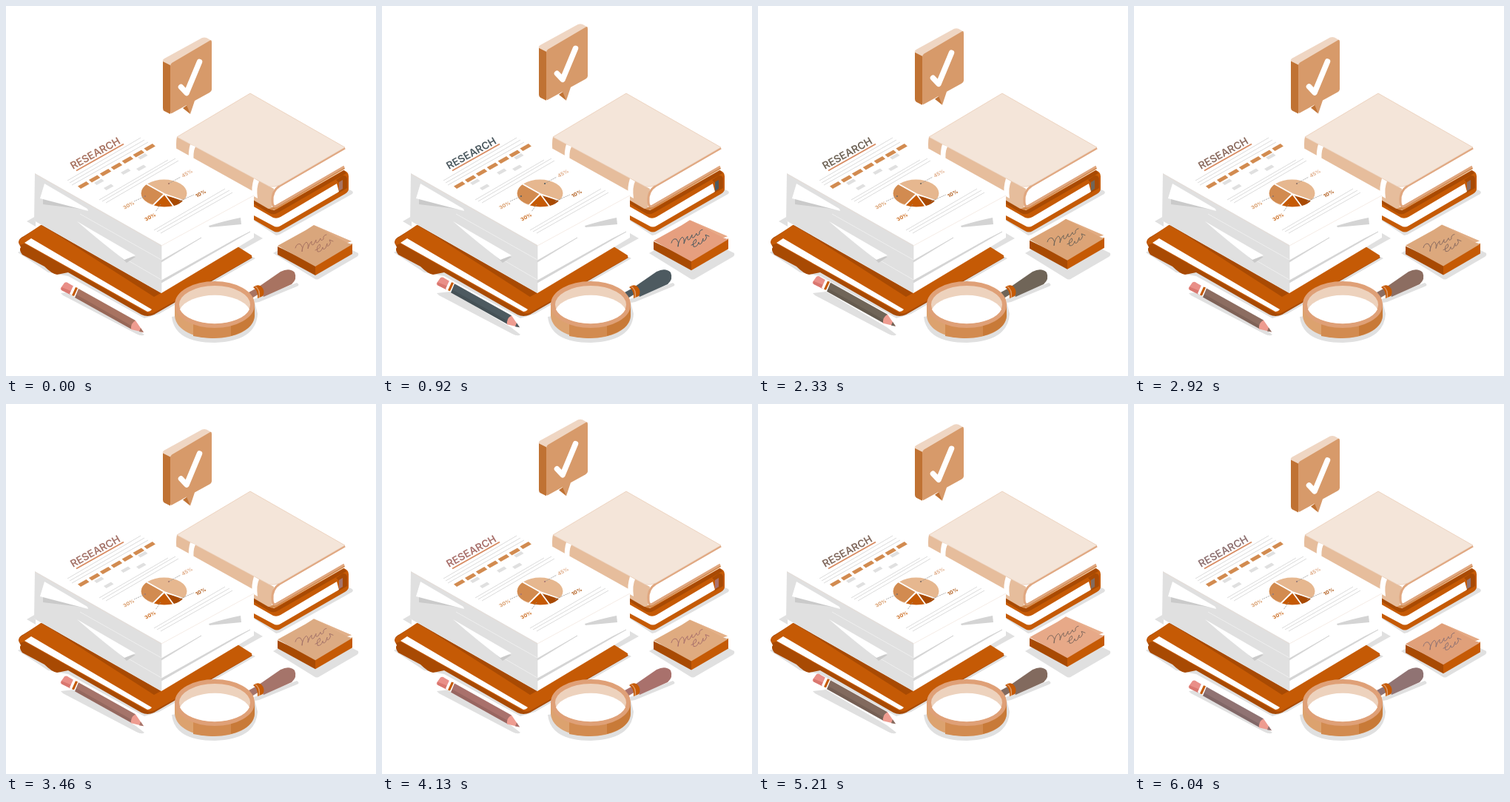
Write an HTML page that moves like this. It is 500 by 500 pixels and loops after 6080 ms.

```html
<!DOCTYPE html>
<html lang="en">
<head>
<meta charset="utf-8">
<title>Research</title>
<style>
html, body { margin: 0; width: 100%; height: 100%; overflow: hidden; background: #fff; }
svg { display: block; width: 100vw; height: 100vh; }
text { font-family: Inter, "Open Sans", sans-serif; }
.shade { fill: #e0e0e0; }
.orange { fill: #c55a05; }
.rust { fill: #a84a03; }
.tan { fill: #d28b50; }
.peach { fill: #e6bd9c; }
.ink { fill: var(--ink); }
.note { fill: var(--note); }
.white { fill: #fff; }
.rule { fill: none; stroke: #d2d2d2; stroke-width: .8; }
.pen { fill: none; stroke: var(--ink); stroke-width: 1; stroke-linecap: round; stroke-linejoin: round; }
.label { font-size: 7px; font-weight: 600; }
</style>
</head>
<body>
<svg viewBox="0 0 500 500">
  <g id="shadows" class="shade">
    <path d="M16 333L57 360L84 365L187 422L207 416L337 341L300 322L60 310Z"/>
    <path d="M28 291L40 284V298ZM335 307L347 314L300 340L210 391L335 300Z"/>
    <path d="M335 290L365 310Q369 310 373 307L466 255Q472 252 466 249L440 240Z"/>
    <path d="M361 334L415 303L476 334Q477 337 474 339L424 368Q420 371 416 368Z"/>
    <path d="M224 420Q228 455 282 455Q338 453 340 416L335 396L393 374Q398 377 393 379L342 400Z"/>
    <path d="M74 388L92 386L174 434L187 444Q184 447 176 443L77 391Z"/>
  </g>

  <g id="lowerBook">
    <path class="orange" d="M333 260L362 276L456 222Q463 224 463 230V247Q463 251 458 254L371 304Q366 307 361 304L335 289Z"/>
    <path class="white" d="M333 270L361 286Q366 288 371 285L447 240L450 251L371 297Q366 300 361 297L333 282Z"/>
    <path class="rust" d="M333 260L358 275Q362 277 366 275L457 222L460 226L368 279Q362 283 356 280L333 266Z"/>
    <path class="rust" d="M446 235L455 229Q461 229 461 234V246L449 253L451 248V240Z"/>
    <path class="ink" d="M450 238L455 235V247L450 250Z"/>
  </g>
  <g id="upperBook">
    <path class="peach" d="M231 177L362 247L359 274Q355 275 351 272L231 202Q229 184 231 177Z"/>
    <path class="tan" d="M356 274L456 216L458 220L364 275Q359 277 356 274Z"/>
    <path class="white" d="M363 269Q359 258 365 250L376 241L457 194Q453 205 457 216Z"/>
    <path d="M458 192L370 243Q359 250 360 264Q360 273 366 270L457 217" fill="none" stroke="#e0a780" stroke-width="3"/>
    <path d="M231 177L330 118L458 191L370 242Q363 245 356 244Z" fill="#f4e5d9" stroke="#e8c8af" stroke-width=".7"/>
    <path class="white" d="M249 187L256 190Q252 198 254 214L247 210Q246 195 249 187ZM335 233L342 237Q338 245 340 260L333 256Q331 246 335 233Z"/>
  </g>

  <g id="folder">
    <path class="rust" d="M17 320Q17 314 24 311L48 296L313 326L333 340L200 417Q191 421 183 417L84 360L69 363Q62 362 52 352L22 336Q17 329 20 326Z"/>
    <path class="orange" d="M17 319Q18 315 24 312L47 296L200 384L313 325L332 337Q333 340 329 342L201 414Q195 417 190 414L25 321L19 323Z"/>
    <path class="white" d="M25 320L34 314L197 410Q195 413 191 413Z"/>
    <path class="rust" d="M36 289L49 296L200 393L211 387L205 380Z"/>
  </g>

  <g id="stack">
    <path class="white" d="M39 227L184 177L231 193L335 251V313L210 388L38 290Z"/>
    <path class="shade" d="M39 226L210 323V388L38 290Z"/>
    <path d="M100 281L210 343M160 341L210 370" stroke="#efefef"/>
    <path d="M210 344L264 313L210 346ZM210 371L312 314L330 305L210 374Z" fill="#d4d4d4" stroke="#d4d4d4" stroke-width=".8"/>
    <path d="M50 260L111 276L92 273L50 268ZM150 334L175 339L163 347Z" fill="#cacaca"/>
    <path class="white" d="M52 240L110 274L111 277L46 260ZM96 291L118 304L175 337L160 343Q132 322 96 291Z"/>
    <path d="M274 297Q297 290 317 286L318 295L275 299Z" fill="#d4d4d4"/>
    <path d="M210 324V387" stroke="#dedede" stroke-width=".7"/>
    <path d="M39 227L210 324L335 256" fill="none" stroke="#ead8cc" stroke-width=".5"/>
  </g>

  <g id="report">
    <text class="ink" transform="matrix(.865 -.473 .5 .85 90.5 221)" font-size="14" font-weight="600">RESEARCH</text>
    <path d="M95 222.500L159 186.500" stroke="#d78a60" stroke-width="1.8"/>
    <path class="rule" d="M83 236L182 178M86 239L187 181M89 242L192 184M126 262L219 208M130 264L229 206M135 266L233 209M200 303L296 247M204 305L302 249M209 307L306 252"/>
    <g id="cells"></g>
    <ellipse cx="213.500" cy="253" rx="31" ry="18.500" fill="#e6b78f"/>
    <path class="tan" d="M213 254L190 241Q179 250 185 260Q190 266 199 268Z"/>
    <path class="orange" d="M214 256L199 269Q211 273 227 270Z"/>
    <path class="rust" d="M214 256L227 270Q235 268 240 262Z"/>
    <path d="M189 240L214 254L198 270M214 254L228 273M214 254L243 264" fill="none" stroke="#fff" stroke-width="1.8"/>
    <path class="rule" stroke-dasharray="2 1" style="stroke:#999" d="M220 240L236 231M188 257L173 264M209 268L202 278M234 264L254 255"/>
    <circle class="ink" cx="220" cy="240" r="1"/>
    <circle class="ink" cx="188" cy="257" r="1"/>
    <g id="labels"></g>
  </g>

  <g id="sticky">
    <path class="rust" d="M367 325L418 350V364L367 336Z"/>
    <path class="orange" d="M418 350L468 321V335L418 364Z"/>
    <path class="note" d="M367 324L405 303L416 296L467 318L461 320L468 322L418 352Z"/>
    <path d="M416 296L467 318L461 320Z" fill="#e8b795" opacity=".4"/>
    <path class="pen" d="M391 327Q393 320 398 322Q402 326 400 332Q401 322 406 319Q409 321 408 328Q410 320 413 318Q412 325 416 322L419 316Q418 322 422 319L425 314Q425 319 429 315Q428 310 433 309M418 330Q427 327 424 322Q419 325 421 332Q426 333 428 326Q428 331 432 327L434 321Q433 327 437 323Q440 320 437 316L442 318"/>
  </g>

  <g id="pencil">
    <path d="M74 381L79 374Q82 372 85 375L92 379L87 390L75 384Q73 383 74 381Z" fill="#e98f88"/>
    <path d="M75 380L90 386L87 390L75 384Z" fill="#d9776f"/>
    <path class="white" d="M91 378L98 382L94 394L86 389Z"/>
    <path class="orange" d="M94 380L97 381L92 392L89 391Z"/>
    <path class="ink" d="M98 382L175 425L170 437L93 394Z"/>
    <path d="M95 390L171 433L170 437L93 394Z" fill="#000" opacity=".1"/>
    <path d="M175 425L186 441L169 437Q168 429 175 425Z" fill="#ee9c90"/>
    <path class="ink" d="M182 435L186 441L180 440Z"/>
  </g>

  <g id="lens">
    <path class="ink" d="M328 387L339 381L342 389L332 395Z"/>
    <path class="ink" d="M342 379L371 359Q383 353 390 360Q394 369 386 376L348 393Z"/>
    <path class="orange" d="M334 380Q340 375 345 379Q351 385 347 392L340 395Q341 385 334 380Z"/>
    <path d="M337 379Q344 384 342 394" fill="none" stroke="#dc9a6a" stroke-width="1.500"/>
    <path fill="#dca26f" d="M228 403V419C230 439 256 449 282 449S335 438 336 419V403Z"/>
    <path class="tan" d="M253 428Q280 435 304 428V446Q280 452 253 446Z"/>
    <path fill="#c87a38" d="M304 428Q334 418 336 402V419Q334 438 304 446Z"/>
    <ellipse cx="282" cy="403.500" rx="51" ry="28.500" fill="#edd2bd" stroke="#dfa077" stroke-width="6"/>
    <path class="white" d="M235 410A48.500 25.500 0 0 1 329 410A48.500 25.500 0 0 1 235 410Z"/>
  </g>

  <g id="bubble">
    <path fill="#c07233" d="M212 74L222 79V146L214 142Q212 141 212 138ZM239 138L246 133L249 146Z"/>
    <path fill="#efd6c3" d="M212 75Q211 73 214 71L265 43Q268 42 271 43L278 47L222 80Z"/>
    <path fill="#d79a6a" d="M222 81Q222 79 224 77L275 47Q278 45 278 49V113Q278 115 275 117L255 128L249 146L244 134L224 145Q222 146 222 143Z"/>
    <path d="M236.500 109.500L244 117.500L261.500 75.500" fill="none" stroke="#fff" stroke-width="7.500" stroke-linecap="round" stroke-linejoin="round"/>
  </g>
</svg>
<script>
const $ = id => document.getElementById(id);
const LOOP = 6080;

// A bar lying on the sheet, its left corner at x, y.
const bar = (x, y, length, depth, color) =>
  `<path d="M${x} ${y}l${length} ${-length * .56}l${depth} ${depth * .85}l${-length} ${length * .56}z" fill="${color}"/>`;

let cells = '';
for (let i = 0; i < 7; i++) cells += bar(97 + i * 14.9, 243.5 - i * 8.5, 11.5, 4, '#d28b50');
for (const [x, y] of [[119, 239], [132, 246], [155, 225], [178, 204.5], [176, 220]])
  cells += bar(x, y, 10, 3.5, '#e0e0e0');
$('cells').innerHTML = cells;

$('labels').innerHTML = [
  ['45%', 239, 232, '#dda47c'], ['30%', 160, 275, '#d28b50'],
  ['30%', 189, 291, '#c55a05'], ['10%', 258, 259, '#a84a03']
].map(([label, x, y, color]) =>
  `<text class="label" transform="matrix(.88 -.48 .5 .8 ${x} ${y})" fill="${color}">${label}</text>`).join('');

// Time, ink colour, note colour.
const tints = [
  [0, [168, 115, 97], [217, 166, 124]],
  [920, [77, 90, 96], [230, 159, 127]],
  [2330, [112, 101, 88], [220, 164, 119]],
  [3460, [165, 116, 106], [220, 171, 131]],
  [4130, [169, 113, 108], [223, 171, 128]],
  [5210, [130, 106, 94], [231, 169, 136]],
  [6040, [143, 115, 115], [224, 160, 122]]
];
tints.push([LOOP, tints[0][1], tints[0][2]]);

const mix = (a, b, k) => `rgb(${a.map((v, i) => Math.round(v + (b[i] - v) * k))})`;

// Rises and falls evenly once per period, from 0 to 1 and back.
const wave = (t, period) => 1 - Math.abs(1 - 2 * ((t + 40) % period) / period);
const raise = (id, height) => $(id).setAttribute('transform', `translate(0 ${-height})`);

function draw(now) {
  const t = now % LOOP;
  raise('bubble', 30 * wave(t, 3030) - .8);
  const hover = 10 * wave(t, 1515) - .5;
  raise('sticky', hover);
  raise('pencil', hover);

  const next = tints.findIndex(tint => tint[0] > t);
  const [from, ink, note] = tints[next - 1];
  const [to, nextInk, nextNote] = tints[next];
  const k = (t - from) / (to - from);
  const style = document.documentElement.style;
  style.setProperty('--ink', mix(ink, nextInk, k));
  style.setProperty('--note', mix(note, nextNote, k));
}

const start = performance.now();
function tick() {
  draw(performance.now() - start);
  requestAnimationFrame(tick);
}
tick();
</script>
</body>
</html>
```
